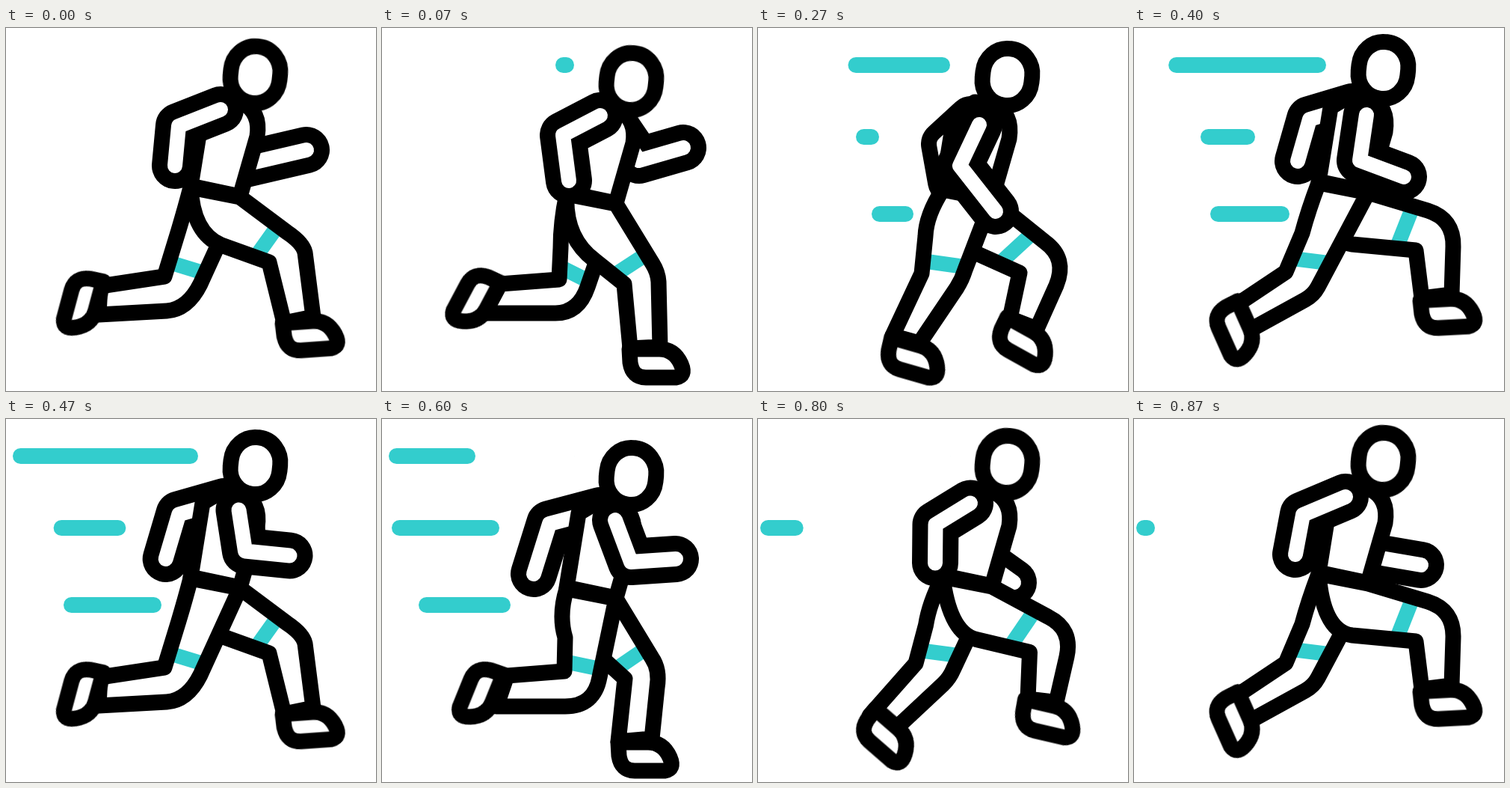
An HTML page without scripts that plays this animation: 495x485 px, repeating every 940 ms.

```html
<!DOCTYPE html>
<html lang="en">
<head>
<meta charset="utf-8">
<title>Runner</title>
<style>
html, body { margin: 0; width: 100%; height: 100%; overflow: hidden; background: #fff; }
svg { display: block; width: 495px; height: 485px; }

/* One cycle is 14 held poses; a stride is half of it. */
svg * { animation: 940ms step-end -8ms infinite; }
.body, .stance *, .swing * { animation-duration: 470ms; }

path, rect { stroke-linecap: round; stroke-linejoin: round; }
.outline { fill: none; stroke: #000; stroke-width: 21; }
.skin { fill: #fff; }
.solid { fill: #fff; stroke: #000; stroke-width: 21; }
.sleeve { fill: none; stroke: #000; stroke-width: 62; }
.arm { fill: none; stroke: #fff; stroke-width: 20; }
.band { fill: none; stroke: #33cdcd; stroke-width: 20; stroke-linecap: butt; }
.speed { fill: #33cdcd; height: 21px; rx: 10.5px; width: 0; }

.body { animation-name: bob; }
.stance .leg { animation-name: stance-leg; }
.stance .band { animation-name: stance-band; }
.stance .foot { animation-name: stance-foot; }
.swing .leg { animation-name: swing-leg; }
.swing .band { animation-name: swing-band; }
.swing .foot { animation-name: swing-foot; }
.near-arm { animation-name: near-arm; }
.far-arm { animation-name: far-arm; }
.speed.top { animation-name: speed-top; }
.speed.middle { animation-name: speed-middle; }
.speed.bottom { animation-name: speed-bottom; }

/* The supporting leg is the near one in the first stride, the far one in the second. */
.near.stance { animation-name: first-stride; }
.far.stance { animation-name: second-stride; }
@keyframes first-stride { 0% { visibility: visible } 50% { visibility: hidden } }
@keyframes second-stride { 0% { visibility: hidden } 50% { visibility: visible } }

@keyframes bob {
  0% { transform: translateY(0) }
  14.286% { transform: translateY(9px) }
  28.571% { transform: translateY(14px) }
  42.857% { transform: translateY(8px) }
  57.143% { transform: translateY(3px) }
  71.429% { transform: translateY(-2px) }
  85.714% { transform: translateY(-6px) }
}

/* Leg: front hip, rounded knee, ankle, knee hollow, rounded seat. */
@keyframes stance-leg {
  0% { d: path("M313 226L376 273Q397 287 400 300L411 386L372 394L352 313L288 290Q250 274 247 213Z") }
  14.286% { d: path("M313 226L362 306Q369 317 370 330L372 417L332 419L324 333L284 301Q244 271 247 213Z") }
  28.571% { d: path("M313 226L361 305Q372 321 368 345L361 413L316 417L325 333L292 303Q250 275 247 213Z") }
  42.857% { d: path("M313 226L358 302Q370 322 362 342L322 417L281 420L293 324L269 277Q252 252 247 213Z") }
  57.143% { d: path("M313 226L277 320Q273 333 266 344L216 418L180 408L219 325L224 275Q225 247 247 213Z"); animation-timing-function: steps(2) }
  85.714% { d: path("M313 226L246 352Q240 363 229 369L158 408L119 388L203 332L225 280Q233 250 247 213Z") }
}
@keyframes swing-leg {
  0% { d: path("M313 226L260 342Q243 376 215 378L124 383L126 345L212 332L231 270Q240 240 247 213Z") }
  14.286% { d: path("M313 226L275 337Q263 372 232 372L137 372L158 333L237 327L239 285Q239 250 247 213Z") }
  28.571% { d: path("M313 226L291 331Q284 370 245 370L153 370L167 329L244 323L245 278Q236 248 247 213Z") }
  42.857% { d: path("M313 226L363 308Q385 345 340 360L254 388L250 345L313 323L270 279Q249 255 247 213Z") }
  57.143% { d: path("M313 226L384 283Q414 305 399 341L373 399L337 385L350 324L292 298Q260 285 247 213Z"); animation-timing-function: steps(2) }
  85.714% { d: path("M313 226L393 250Q428 261 427 298L425 362L385 367L377 303L292 295Q253 290 247 213Z") }
}

@keyframes stance-band {
  0% { d: path("M361 268L336 303") }
  14.286% { d: path("M351 295L308 323") }
  28.571% { d: path("M354 292L310 322") }
  42.857% { d: path("M345 292L300 312") }
  57.143% { d: path("M226 309L276 316"); animation-timing-function: steps(2) }
  85.714% { d: path("M212 314L260 320") }
}
@keyframes swing-band {
  0% { d: path("M218 313L264 327") }
  14.286% { d: path("M236 309L276 329") }
  28.571% { d: path("M244 310L292 320") }
  42.857% { d: path("M304 310L352 287") }
  57.143% { d: path("M363 275L326 309"); animation-timing-function: steps(2) }
  85.714% { d: path("M371 250L352 298") }
}

@keyframes stance-foot {
  0% { transform: translate(390px, 393px) rotate(-4deg) }
  14.286% { transform: translate(351px, 420px) rotate(0deg) }
  28.571% { transform: translate(336px, 418px) rotate(0deg) }
  42.857% { transform: translate(298px, 424px) rotate(0deg) }
  57.143% { transform: translate(198px, 416px) rotate(16deg); animation-timing-function: steps(2) }
  85.714% { transform: translate(147px, 389px) rotate(66deg) }
}
@keyframes swing-foot {
  0% { transform: translate(125px, 358px) rotate(105deg) }
  14.286% { transform: translate(149px, 349px) rotate(118deg) }
  28.571% { transform: translate(155px, 346px) rotate(112deg) }
  42.857% { transform: translate(246px, 368px) rotate(98deg) }
  57.143% { transform: translate(351px, 393px) rotate(29deg); animation-timing-function: steps(2) }
  85.714% { transform: translate(403px, 369px) rotate(-3deg) }
}

/* Arm: shoulder, elbow, hand. */
@keyframes near-arm {
  0% { d: path("M287 109L231 131L226 184") }
  7.143% { d: path("M292 108L242 134L250 195"); animation-timing-function: steps(3) }
  28.571% { d: path("M296 126L270 181L318 242"); animation-timing-function: steps(2) }
  42.857% { d: path("M311 122L302 183L361 205"); animation-timing-function: steps(2) }
  57.143% { d: path("M312 121L338 170L398 160") }
  64.286% { d: path("M312 121L333 177L393 173") }
  71.429% { d: path("M308 119L299 177L343 217") }
  78.571% { d: path("M285 119L249 152L258 202"); animation-timing-function: steps(2) }
  92.857% { d: path("M283 110L226 134L216 187") }
}
@keyframes far-arm {
  0% { d: path("M300 125L312 184L402 163") }
  7.143% { d: path("M312 121L344 168L403 151") }
  14.286% { d: path("M312 121L338 175L395 172") }
  21.429% { d: path("M308 119L304 178L350 217") }
  28.571% { d: path("M285 119L249 152L258 202"); animation-timing-function: steps(2) }
  42.857% { d: path("M292 111L235 128L219 184"); animation-timing-function: steps(3) }
  64.286% { d: path("M292 108L224 126L203 193") }
  71.429% { d: path("M290 110L242 145L237 223") }
  78.571% { d: path("M296 126L275 181L300 240"); animation-timing-function: steps(2) }
  92.857% { d: path("M300 125L308 188L384 201") }
}

/* Speed lines grow to the left, then their right end catches up. */
@keyframes speed-top {
  0% { x: 232px; width: 0 }
  7.143% { x: 232px; width: 25px; animation-timing-function: steps(6) }
  50% { x: 9px; width: 248px; animation-timing-function: steps(3) }
  71.429% { x: 9px; width: 50px }
  78.571%, 100% { x: 9px; width: 0 }
}
@keyframes speed-middle {
  0% { x: 131px; width: 0 }
  28.571% { x: 131px; width: 31px; animation-timing-function: steps(2) }
  42.857% { x: 89px; width: 73px; animation-timing-function: steps(3) }
  64.286% { x: 13px; width: 144px }
  71.429% { x: 3px; width: 123px; animation-timing-function: steps(3) }
  92.857%, 100% { x: 3px; width: 25px }
}
@keyframes speed-bottom {
  0% { x: 177px; width: 0 }
  21.429% { x: 177px; width: 31px; animation-timing-function: steps(3) }
  42.857% { x: 102px; width: 106px; animation-timing-function: steps(2) }
  57.143% { x: 52px; width: 156px }
  64.286% { x: 49px; width: 123px; animation-timing-function: steps(2) }
  78.571% { x: 49px; width: 33px }
  85.714%, 100% { x: 49px; width: 0 }
}
</style>
</head>
<body>
<svg viewBox="0 0 495 485">
  <rect class="speed top" y="39"/>
  <rect class="speed middle" y="135"/>
  <rect class="speed bottom" y="238"/>

  <g class="body">
    <path class="far-arm sleeve"/>
    <path class="far-arm arm"/>
    <path class="solid" d="M290 96L263 112L247 211L313 225L336 145Q341 112 316 100Z"/>

    <g class="far stance">
      <path class="leg skin"/>
      <path class="band"/>
      <path class="leg outline"/>
      <path class="foot solid" d="M-20 0L-19 18Q-16 38 2 38H42Q56 36 49 20Q40 0 20 0Z"/>
    </g>
    <g class="swing">
      <path class="leg skin"/>
      <path class="band"/>
      <path class="leg outline"/>
      <path class="foot solid" d="M-20 0L-19 18Q-16 38 2 38H42Q56 36 49 20Q40 0 20 0Z"/>
    </g>
    <g class="near stance">
      <path class="leg skin"/>
      <path class="band"/>
      <path class="leg outline"/>
      <path class="foot solid" d="M-20 0L-19 18Q-16 38 2 38H42Q56 36 49 20Q40 0 20 0Z"/>
    </g>

    <path class="near-arm sleeve"/>
    <path class="near-arm arm"/>
    <rect class="solid" x="300.5" y="24.5" width="66" height="76" rx="32" ry="34" transform="rotate(6 333.5 62.5)"/>
  </g>
</svg>
</body>
</html>
```
